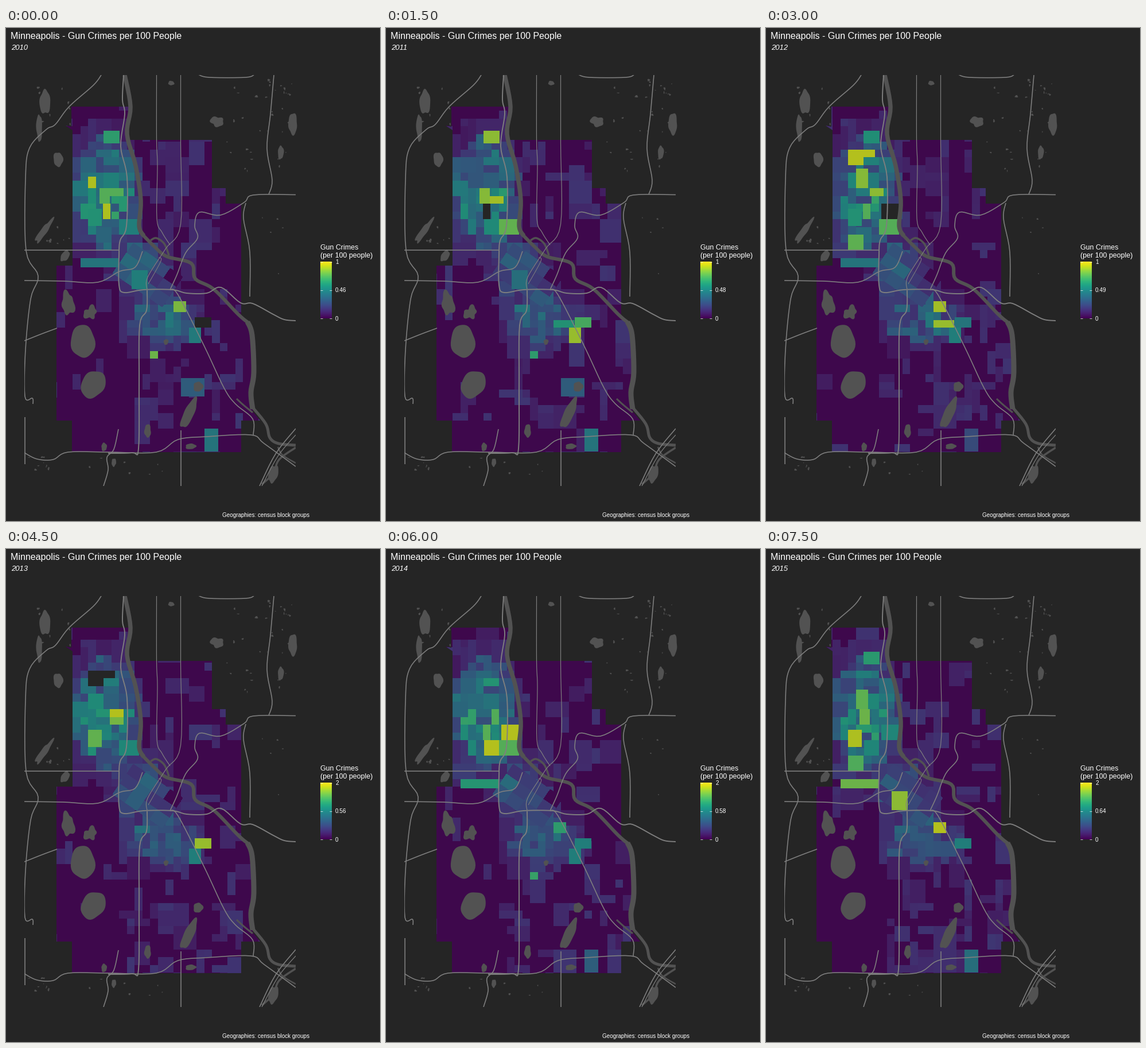
Write a matplotlib script that moves like this. It is 652 by 859 pixels and loops after 8000 ms.

```python
import matplotlib.pyplot as plt
import numpy as np
from matplotlib.animation import FuncAnimation
from matplotlib.collections import PolyCollection
from matplotlib.patches import Polygon, Rectangle

W, H, DPI = 652, 859, 64
BG, WATER, ROAD = "#252525", "#525252", "#7f7f7f"
FIRST, YEARS, HOLD = 2010, 6, 3
MID = ["0.46", "0.48", "0.49", "0.56", "0.58", "0.64"]
STEP, LEFT, TOP = 13.5, 116, 279      # street grid
ALPHA = 0.82

rng = np.random.default_rng(7)
fig = plt.figure(figsize=(W / DPI, H / DPI), dpi=DPI, facecolor=BG)
ax = fig.add_axes([0, 0, 1, 1])
ax.axis("off")
cmap = plt.get_cmap("viridis")
shapes, rates = [], []


def shade(v):
    """Fill for a rate from 0 to 1; None shows what lies below, -1 is no data."""
    if v is None:
        return (0, 0, 0, 0)
    if v < 0:
        return BG
    return tuple(ALPHA * c + (1 - ALPHA) * 0.145 for c in cmap(v)[:3])


def smooth(flat, n=6):
    """Catmull-Rom curve through the points."""
    p = np.array(flat, float).reshape(-1, 2)
    p = np.vstack([p[:1], p, p[-1:]])
    t = np.linspace(0, 1, n, endpoint=False)[:, None]
    parts = [b + t * (c - a) / 2 + t**2 * (2 * a - 5 * b + 4 * c - d) / 2
             + t**3 * (3 * b - a - 3 * c + d) / 2
             for a, b, c, d in zip(p, p[1:], p[2:], p[3:])]
    return np.vstack(parts + [p[-1:]])


def line(width, color, *flat):
    art, = ax.plot(*smooth(flat).T, color=color, lw=width * 72 / DPI,
                   zorder=4 if color == ROAD else 3,
                   solid_capstyle="butt", solid_joinstyle="round")
    art.set_clip_path(Rectangle((32, 82), 473, 716, transform=ax.transData))


def road(*flat, width=1.6):
    line(width, ROAD, *flat)


def river(width, *flat):
    line(width, WATER, *flat)


def blob(cx, cy, rx, ry, lean=0.0, rough=0.06):
    """Lake with a wavy shore; lean shifts its lower half sideways."""
    t = np.linspace(0, 2 * np.pi, 40)
    a, b, c = rng.uniform(0, 2 * np.pi, 3)
    r = 1 + rough * (np.sin(2 * t + a) + np.sin(3 * t + b) + np.sin(5 * t + c))
    dy = ry * r * np.sin(t)
    ax.fill(cx + rx * r * np.cos(t) + lean * dy, cy + dy, color=WATER, lw=0, zorder=3)


def label(x, y, s, size, **kw):
    return ax.text(x, y, s, color="white", fontsize=size * 72 / DPI,
                   family="Liberation Sans", va="baseline", **kw)


def bump(x, y, cx, cy, rx, ry):
    return np.exp(-(((x - cx) / rx) ** 2 + ((y - cy) / ry) ** 2) ** 2)


def field(x, y):
    """Typical rate: high in the north-west, less downtown and south of it."""
    return max(0.46 * bump(x, y, 172, 288, 62, 108), 0.26 * bump(x, y, 232, 420, 50, 55),
               0.3 * bump(x, y, 270, 505, 72, 55))


def series(x, y):
    """Rates of one block in all years."""
    f = field(x, y)
    if f > 0.08:
        return f * rng.uniform(0.75, 1.25) * rng.uniform(0.6, 1.4, YEARS)
    quiet = x < 210 and y > 440
    return np.where(rng.random(YEARS) < (0.06 if quiet else 0.33),
                    rng.uniform(0.07, 0.17, YEARS), 0)


def street_blocks():
    """Cover the grid with blocks of one or more cells, smaller where busy."""
    taken = set()
    for row in range(-11, 35):
        for col in range(-3, 25):
            if (col, row) in taken:
                continue
            busy = field(LEFT + STEP * col, TOP + STEP * row) > 0.12
            w, h = rng.integers(1, 3 if busy else 4, 2)
            while any((col + i, row) in taken for i in range(1, w)):
                w -= 1
            taken.update((col + i, row + j) for i in range(w) for j in range(h))
            add(col, row, w, h, series(LEFT + STEP * (col + w / 2), TOP + STEP * (row + h / 2)))


def add(col, row, w, h, values):
    x, y = LEFT + STEP * col, TOP + STEP * row
    x1, y1 = x + STEP * w, y + STEP * h
    shapes.append([(x, y), (x1, y), (x1, y1), (x, y1)])
    rates.append(values)


def downtown():
    """Blocks turned to follow the river."""
    c, s = np.cos(0.6), np.sin(0.6)
    for i in range(4):
        for j in range(3):
            u = np.array([0, 26, 26, 0]) + 26 * i
            v = np.array([0, 0, 21, 21]) + 21 * j
            x, y = 222 + c * u - s * v, 375 + s * u + c * v
            shapes.append(np.column_stack([x, y]))
            rates.append(series(x.mean(), y.mean()))


def spot(col, row, w, h, **by_year):
    """Block that stands out in some years, e.g. y10=0.9."""
    add(col, row, w, h, [by_year.get(f"y{10 + k}") for k in range(YEARS)])


street_blocks()
downtown()
spot(2, -5, 3.5, 1, y12=0.93, y13=-1)
spot(2, -4, 2, 1, y12=0.93, y13=-1)
spot(4, -7.4, 2.1, 1.6, y10=0.65, y11=0.86, y12=0.58, y15=0.64)
spot(2, -1.5, 1, 1.5, y10=0.92)
spot(3, -2.5, 1.6, 2.5, y12=0.85, y15=0.77)
spot(3.5, 0, 1.3, 2, y10=0.75, y11=0.85, y15=0.8)
spot(4.8, 0, 1.8, 1, y10=0.75, y12=0.86, y13=0.93)
spot(4.8, 1, 1.8, 1, y11=0.9, y13=0.82)
spot(3.9, 2, 1, 2, y10=0.92, y11=-1, y12=0.75, y14=0.76)
spot(2, 2.7, 1.8, 2.2, y10=0.6, y12=0.6, y13=0.78, y15=0.92)
spot(6.3, 2, 2.3, 2, y12=-1, y14=0.93, y15=0.54)
spot(4.1, 4, 1.9, 2, y11=0.56, y14=0.93, y15=0.54)
spot(6, 4, 2.6, 2, y10=0.5, y11=0.78, y12=0.75, y13=0.55, y14=0.75)
spot(2, 6, 2, 2, y12=0.77, y15=0.74)
spot(1, 9, 5, 1.2, y10=0.45, y12=0.45, y14=0.62, y15=0.8)
spot(7.6, 10.6, 2.1, 2.4, y10=0.5, y11=0.42, y15=0.86)
spot(13, 14.6, 1.7, 1.4, y10=0.83, y12=0.9, y14=0.65, y15=0.93)
spot(13, 17, 2.7, 1, y11=0.6, y12=0.88)
spot(15.8, 16.7, 2.1, 1.3, y10=-1, y11=0.72, y12=0.45, y13=0.88, y14=0.5, y15=0.5)
spot(15, 18, 1.6, 2, y10=0.48, y11=0.88, y12=0.5, y13=0.5, y14=0.5)
spot(10, 21, 1, 1, y10=0.8, y11=0.65, y14=0.68)
spot(14, 24.5, 3, 2.4, y10=0.33, y11=0.33)
spot(17, 31, 1.8, 3, y10=0.45, y11=0.45, y12=0.25, y14=0.34, y15=0.42)

# city area
edge = np.array([114, 137, 218, 137, 214, 178, 212, 195, 359, 195, 359, 279, 383, 279,
                 383, 306, 410, 306, 410, 500, 427, 518, 433, 600, 427, 640, 430, 668,
                 443, 684, 410, 684, 410, 739, 115, 739, 115, 684, 88, 684, 88, 414,
                 116, 414, 116, 178, 104, 170, 114, 172]).reshape(-1, 2)
city = Polygon(edge, color=shade(0), lw=0, zorder=1)
ax.add_patch(city)
cells = PolyCollection(shapes, linewidths=0, antialiaseds=False, zorder=2)
ax.add_collection(cells)
cells.set_clip_path(city)

# lakes
blob(134, 546, 21, 29, rough=0.03)
blob(152, 621, 21, 24, -0.15, rough=0.03)
blob(108, 480, 11, 20, rough=0.12)
blob(147, 496, 11, 11, rough=0.16)
blob(319, 671, 10, 25, -0.42)
blob(335, 625, 8, 9)
blob(279, 547, 4, 5)
blob(247, 702, 6, 11)
blob(171, 730, 5, 7)
blob(322, 729, 9, 5)
blob(466, 777, 8, 16, -0.2)
blob(188, 757, 4, 7)
blob(68, 129, 9, 22)
blob(58, 174, 5, 24)
blob(91, 229, 8, 13)
blob(66, 354, 7, 20, -0.6, 0.12)
blob(103, 397, 7, 10, -0.4)
blob(368, 163, 11, 9, rough=0.1)
blob(500, 167, 8, 18)
blob(479, 217, 5, 12)
blob(288, 96, 5, 4)

# scattered ponds: area and count
for x0, y0, x1, y1, count in [(380, 90, 500, 250, 34), (55, 92, 112, 200, 8),
                              (70, 345, 112, 380, 8), (430, 330, 490, 440, 5),
                              (40, 742, 85, 775, 10), (140, 745, 280, 795, 7)]:
    for x, y in rng.uniform((x0, y0), (x1, y1), (count, 2)):
        blob(x, y, *rng.uniform(0.5, 2.4, 2), rough=0.15)

# rivers
river(7.5, 207, 82, 217, 137, 211, 185, 226, 240, 235, 300, 232, 345, 240, 362)
river(6, 238, 360, 258, 380, 280, 398, 323, 410, 330, 437, 362, 455, 405, 499, 423, 514)
river(9, 421, 512, 429, 535, 432, 600, 427, 635, 430, 664)
river(5, 429, 660, 453, 690, 460, 714, 475, 724, 505, 727)
river(3.5, 252, 370, 262, 366, 276, 376, 284, 396)
river(3, 402, 646, 414, 657, 430, 670)
river(3.5, 505, 731, 476, 752, 466, 776, 446, 795)
river(2.5, 474, 730, 482, 744, 505, 758)

# roads
road(166, 82, 152, 100, 110, 137, 86, 168, 70, 177, 41, 209, 34, 262, 35, 388,
     56, 432, 43, 472, 34, 560, 33, 642, 46, 645, 47, 655)
road(32.5, 678, 32.5, 760)
road(32, 740, 54, 751, 82, 752, 108, 739, 180, 739, 262, 739, 300, 717, 350, 712,
     427, 709, 450, 724, 505, 764)
road(205, 82, 203, 125, 207, 150, 200, 206, 211, 260, 210, 345, 199, 370, 197, 395,
     197, 448, 206, 461, 240, 456, 290, 456, 315, 462, 350, 462, 375, 452, 409, 479,
     430, 480, 466, 499, 485, 508, 505, 510, width=1.9)
road(262.5, 82, 262.5, 195, 264, 240, 263, 332, 272, 356, 286, 378, width=1.2)
road(304.5, 82, 304.5, 200, 304.5, 342, 278, 385, 247, 434, 246, 456, width=1.2)
road(266, 400, 270, 406, 248, 446, width=1)
road(505, 290.5, 431, 291, 415, 304, 374, 326, 337, 321, 329, 345, 334, 366,
     313, 392, 298, 430, 286, 456)
road(467, 82, 461, 150, 455, 210, 464, 265, 458, 290)
road(335, 81, 354, 86, 418, 86, 433, 81)
road(418, 305, 414, 332, 425, 390, 425, 468)
road(32, 387, 197, 387)
road(32, 440, 100, 441, 160, 443, 198, 424, 225, 417, 238, 389)
road(246, 457, 245, 492, 233, 518, 232, 620, 231, 733, 220, 740, 178, 741, width=1.9)
road(286, 456, 300, 465, 345, 553, 380, 627, 400, 655, 430, 681, 431, 709)
road(170, 798, 178, 770, 176, 748, 188, 734, 196, 699)
road(32, 545, 62, 533, 89, 523)
road(305, 701, 305, 798)
road(442, 798, 470, 742, 505, 698)
road(446, 798, 474, 746, 505, 709, width=1.2)

# text and legend
label(8, 18.7, "Minneapolis - Gun Crimes per 100 People", 16)
year = label(9, 38, "", 13, style="italic")
label(377, 852, "Geographies: census block groups", 9.9)
label(548, 386, "Gun Crimes", 12.4)
label(548, 400, "(per 100 people)", 12.4)
ax.imshow(np.linspace(1, 0, 100)[:, None], cmap=cmap, extent=(548, 568, 506, 407),
          aspect="auto", zorder=2)
ax.hlines([407.5, 456.5, 505.5] * 2, [548] * 3 + [564] * 3, [552] * 3 + [568] * 3,
          color="white", lw=0.8, zorder=3)
top = label(574, 411, "", 10)
mid = label(574, 460.5, "", 10)
label(574, 510, "0", 10)

ax.set_xlim(0, W)
ax.set_ylim(H, 0)


def draw(i):
    k = i // HOLD
    cells.set_facecolor([shade(v[k]) for v in rates])
    year.set_text(str(FIRST + k))
    top.set_text("1" if k < 3 else "2")
    mid.set_text(MID[k])
    return cells, year, top, mid


anim = FuncAnimation(fig, draw, frames=16, init_func=lambda: draw(0), interval=500,
                     repeat=True, repeat_delay=0)
plt.show()
```
